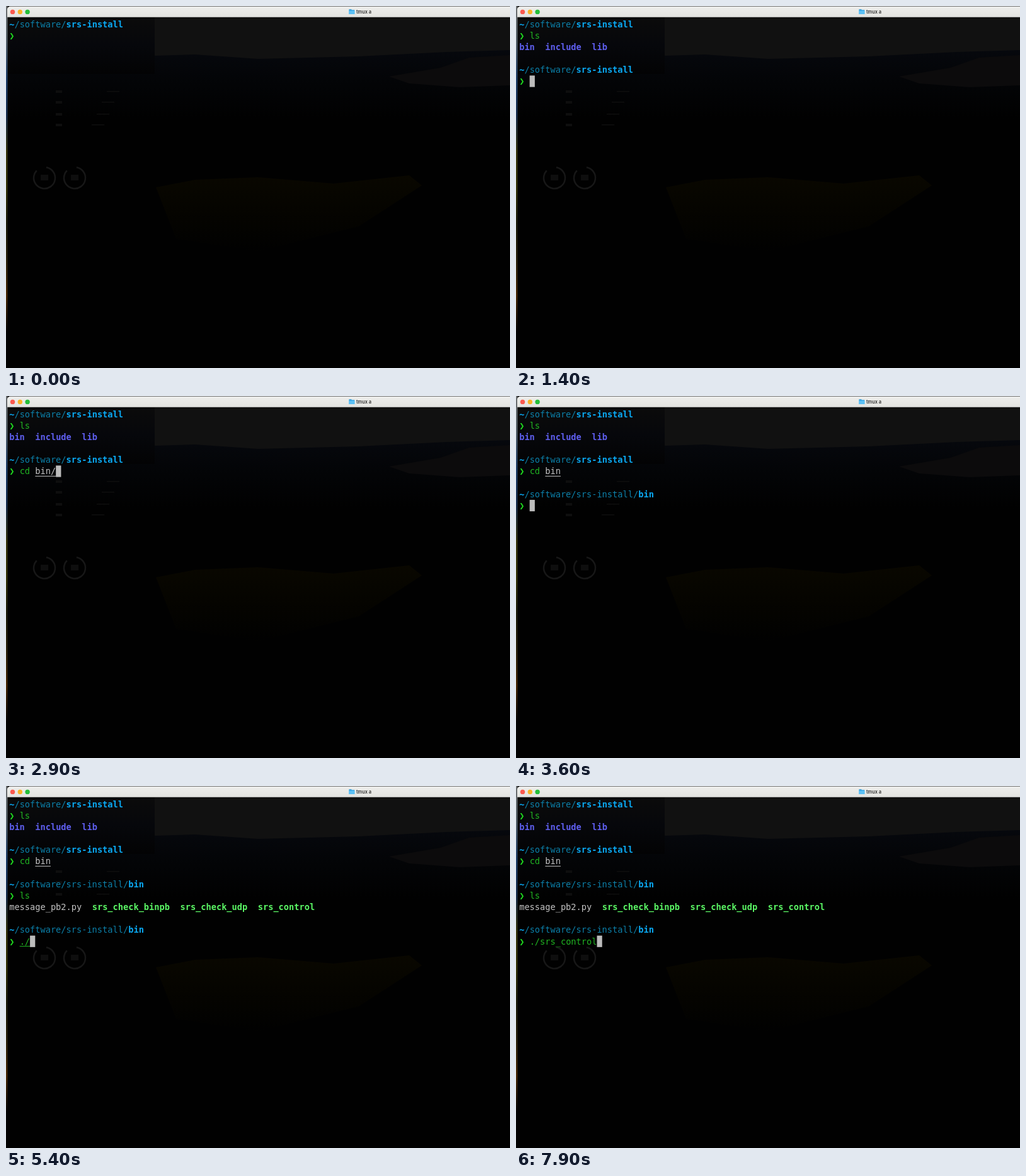
An HTML page with a canvas for the animation above (8000 ms loop, 800 by 575 pixels).

```html
<!DOCTYPE html>
<html lang="en">
<head>
<meta charset="utf-8">
<title>Terminal</title>
<style>
html, body { margin: 0; width: 100%; height: 100%; overflow: hidden; background: #000; }
canvas { display: block; }
</style>
</head>
<body>
<canvas id="stage" width="800" height="575"></canvas>
<script>
const ctx = document.getElementById('stage').getContext('2d');
const LOOP = 8000, CELL = 8.22, LEFT = 5.2, PITCH = 18.17;
const MONO = '"DejaVu Sans Mono", "Noto Sans Mono", monospace';

// colour, bold, underlined
const STYLES = {
  path: ['#0c80aa'],
  here: ['#0aaaf5', true],
  mark: ['#1fe01f', true],
  cmd: ['#20b422'],
  bad: ['#d23a32'],
  dir: ['#5f5ff0', true],
  exe: ['#5bf765', true],
  text: ['#c4c4c4'],
  file: ['#c4c4c4', false, true],
  cmdFile: ['#20b422', false, true]
};

// Each output line: start time, row, then runs of text and style
const output = [
  [1000, 2, ['bin', 'dir'], ['  ', 'text'], ['include', 'dir'], ['  ', 'text'], ['lib', 'dir']],
  [4600, 9, ['message_pb2.py  ', 'text'], ['srs_check_binpb', 'exe'], ['  ', 'text'],
    ['srs_check_udp', 'exe'], ['  ', 'text'], ['srs_control', 'exe']]
];

// Each prompt: start time, row of its path, path, folder, then states of the typed line
const prompts = [
  [0, 0, '/software/', 'srs-install', [
    [600, ['l', 'cmd']],
    [700, ['ls', 'cmd']]]],
  [1000, 4, '/software/', 'srs-install', [
    [1700, ['c', 'bad']],
    [1800, ['cd', 'cmd']],
    [2000, ['cd ', 'cmd']],
    [2400, ['cd ', 'cmd'], ['b', 'file']],
    [2700, ['cd ', 'cmd'], ['bin/', 'file']],
    [3200, ['cd ', 'cmd'], ['bin', 'file']]]],
  [3200, 7, '/software/srs-install/', 'bin', [
    [4100, ['l', 'cmd']],
    [4200, ['ls', 'cmd']]]],
  [4600, 11, '/software/srs-install/', 'bin', [
    [5200, ['.', 'cmd']],
    [5300, ['./', 'cmdFile']],
    [5800, ['./s', 'file']],
    [6000, ['./srs_', 'file']],
    [6500, ['./srs_c', 'file']],
    [6700, ['./srs_co', 'file']],
    [7200, ['./srs_control', 'cmd']]]]
];

const rowY = row => 29 + PITCH * row;

function rect(x, y, w, h, color) {
  ctx.fillStyle = color;
  ctx.fillRect(x, y, w, h);
}

function disc(x, y, r, color) {
  ctx.fillStyle = color;
  ctx.beginPath();
  ctx.arc(x, y, r, 0, 7);
  ctx.fill();
}

function shape(color, ...points) {
  ctx.fillStyle = color;
  ctx.beginPath();
  points.forEach(p => ctx.lineTo(...p));
  ctx.fill();
}

function fade(y0, y1, ...colors) {
  const g = ctx.createLinearGradient(0, y0, 0, y1);
  colors.forEach((c, i) => g.addColorStop(i / (colors.length - 1), c));
  return g;
}

// Draws runs of text and returns the next free column
function write(row, col, runs) {
  for (const [text, style] of runs) {
    const [color, bold, line] = STYLES[style];
    const x = LEFT + col * CELL, y = rowY(row);
    ctx.font = `${bold ? 'bold ' : ''}13.65px ${MONO}`;
    ctx.fillStyle = color;
    ctx.fillText(text, x, y + 4.6);
    if (line) rect(x, y + 7, text.length * CELL, 1, color);
    col += text.length;
  }
  return col;
}

// Dim desktop behind the translucent window
function backdrop() {
  rect(0, 0, 800, 575, '#010101');
  rect(2, 70, 798, 110, fade(70, 180, '#06080d', '#030406', '#010101'));
  shape('#111111', [236, 18], [800, 18], [800, 70], [700, 73], [560, 80], [400, 84], [300, 77], [236, 79]);
  rect(2, 18, 234, 90, fade(18, 108, '#0b0b0b', '#06070b', '#030304'));
  shape('#0c0b0c', [800, 78], [735, 82], [690, 98], [608, 112], [640, 123], [720, 129], [800, 126]);
  shape(fade(270, 390, '#090700', '#050400', '#010101'),
    [238, 288], [300, 276], [400, 272], [520, 282], [640, 269], [660, 285], [560, 350], [400, 390], [270, 370]);

  ctx.strokeStyle = '#171717';
  ctx.lineWidth = 2.5;
  for (const x of [61, 109]) {
    ctx.beginPath();
    ctx.arc(x, 273, 17, -1.4, 3.9);
    ctx.stroke();
    rect(x - 6, 268, 12, 9, '#0e0e0e');
  }
  [136, 153, 172, 189].forEach((y, i) => {
    rect(79, y - 2, 10, 4, '#0e0e0e');
    rect(160 - i * 8, y - 1, 20, 1.5, '#0e0e0e');
  });

  rect(0, 0, 2.5, 575, fade(0, 575, '#6d7072', '#55616c', '#20406b', '#1a3050', '#3a3710',
    '#373509', '#1c1c0c', '#2c2410', '#4a2906', '#050505', '#030303'));
}

function titleBar() {
  ctx.fillStyle = fade(0, 18, '#eeeeec', '#e3e3e0');
  ctx.beginPath();
  ctx.roundRect(2, 0.5, 810, 17.3, [5, 0, 0, 0]);
  ctx.fill();
  ['#fb5a50', '#fbb324', '#26bf3a'].forEach((c, i) => disc(10.5 + 11.8 * i, 9.4, 3.7, c));
  rect(544.5, 5.2, 4, 2, '#2c9ad8');
  rect(544.5, 6.2, 8.8, 6.8, '#35a6e6');
  rect(544.5, 7.6, 8.8, 5.4, '#5cc0f5');
  ctx.font = '600 7.4px Inter, "Open Sans", sans-serif';
  ctx.fillStyle = '#333333';
  ctx.fillText('tmux a', 556, 11.8);
}

function draw(t) {
  backdrop();
  titleBar();
  for (const [start, row, ...runs] of output) if (t >= start) write(row, 0, runs);

  let cursor;
  for (const [start, row, path, folder, states] of prompts) {
    if (t < start) break;
    write(row, 0, [['~', 'here'], [path, 'path'], [folder, 'here']]);
    write(row + 1, 0, [['❯', 'mark']]);
    const typed = states.filter(s => t >= s[0]).pop() || [0];
    cursor = [row + 1, write(row + 1, 2, typed.slice(1))];
  }
  if (t >= 300) {
    const [row, col] = cursor;
    rect(LEFT + col * CELL, rowY(row) - 9.4, CELL, 18.2, '#bcbcbc');
  }
}

function tick(now) {
  draw(now % LOOP);
  requestAnimationFrame(tick);
}
requestAnimationFrame(tick);
</script>
</body>
</html>
```
